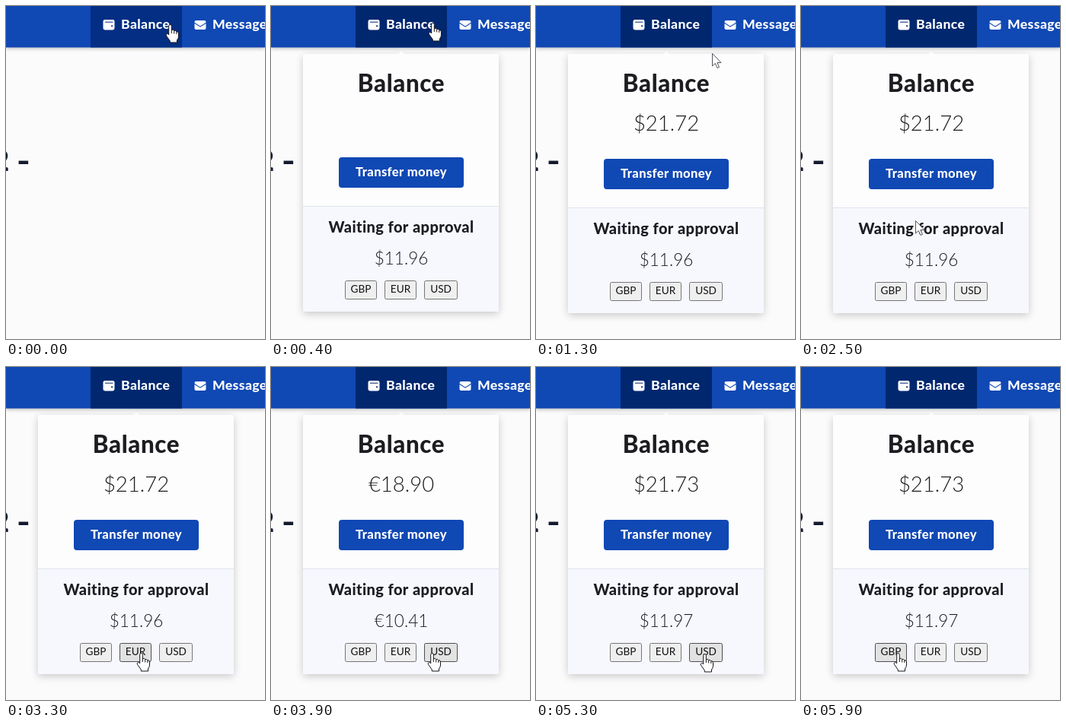
Recreate the animation shown at these times as an HTML page with a canvas. Size 340x438 px, loop 6100 ms.

```html
<!DOCTYPE html>
<html lang="en">
<head>
<meta charset="utf-8">
<title>Balance popup</title>
<style>
html, body { margin: 0; width: 100%; height: 100%; overflow: hidden; background: #fbfbfb; }
canvas { display: block; width: 340px; height: 438px; }
</style>
</head>
<body>
<canvas id="stage"></canvas>
<script>
const W = 340, H = 438, LOOP = 6100, STEP = 100;
const canvas = document.getElementById('stage');
const ctx = canvas.getContext('2d');
const ratio = window.devicePixelRatio || 1;
canvas.width = W * ratio;
canvas.height = H * ratio;
ctx.scale(ratio, ratio);

const FONT = 'Lato, "Open Sans", sans-serif';
const INK = '#1c1c21', BLUE = '#1048b4';
const HEAVY = 800, LIGHT = 300;

// Pointer waypoints: time, x, y
const PATH = [
  [0, 216, 24], [200, 213, 22], [1000, 213, 22], [1300, 232, 62],
  [1500, 266, 130], [1700, 241, 184], [2100, 190, 178], [2400, 151, 196],
  [2500, 151, 282], [2700, 156, 310], [3000, 177, 368], [3100, 178, 376],
  [3400, 178, 376], [3900, 212, 376], [4100, 212, 376], [4300, 222, 377],
  [5400, 222, 377], [5900, 128, 376], [LOOP, 128, 376]
];

// Amounts shown from each time on
const AMOUNTS = [
  [0, '', '$11.96'], [600, '$21.72', '$11.96'],
  [3700, '€18.90', '€10.41'], [4900, '$21.73', '$11.97']
];

const CURRENCIES = [['GBP', 97, 42], ['EUR', 149, 42], ['USD', 201, 44]];

function pointerAt(t) {
  const i = Math.max(1, PATH.findIndex(p => p[0] >= t));
  const [t0, x0, y0] = PATH[i - 1], [t1, x1, y1] = PATH[i];
  const k = (t - t0) / (t1 - t0);
  return { x: x0 + (x1 - x0) * k, y: y0 + (y1 - y0) * k };
}

function inside(p, x, y, w, h) {
  return p.x >= x && p.x < x + w && p.y >= y && p.y < y + h;
}

function box(x, y, w, h, color, r = 0) {
  ctx.fillStyle = color;
  ctx.beginPath();
  ctx.roundRect(x, y, w, h, r);
  ctx.fill();
}

function shadow(color, blur, dy) {
  ctx.shadowColor = color;
  ctx.shadowBlur = blur * ratio;
  ctx.shadowOffsetY = dy * ratio;
}

// Heavy text is tracked slightly wider
function text(str, x, y, size, weight, color = INK, align = 'center', family = FONT) {
  ctx.font = `${weight} ${size}px ${family}`;
  ctx.letterSpacing = weight === HEAVY ? `${size * .02}px` : '0px';
  ctx.textAlign = align;
  ctx.fillStyle = color;
  ctx.fillText(str, x, y);
}

function line(color, width, ...pts) {
  ctx.strokeStyle = color;
  ctx.lineWidth = width;
  ctx.beginPath();
  pts.forEach(([x, y]) => ctx.lineTo(x, y));
  ctx.stroke();
}

function drawHeader(open) {
  const active = open ? '#01276f' : '#032e83';
  ctx.save();
  shadow('rgba(0,0,0,.26)', 5, 1);
  box(0, -10, W, 64.5, BLUE);
  ctx.restore();
  box(111, 0, 120, 54.5, active);

  // wallet
  box(127.5, 18, 15, 13.5, '#fff', 2.4);
  line(active, 1, [130, 21.2], [140.5, 21.2]);
  box(138, 25.2, 2.2, 2.2, active, 1.1);
  text('Balance', 151, 30, 17.6, HEAVY, '#fff', 'left');

  // envelope
  box(247.5, 19, 15, 12, '#fff', 2);
  line(BLUE, 1.1, [247, 22], [255, 27.2], [263, 22]);
  text('Messages', 271, 30, 17.6, HEAVY, '#fff', 'left');
}

function drawCurrency([label, x, w], top, p, pressed) {
  const hover = inside(p, x, top, w, 25);
  const down = pressed === label;
  box(x, top, w, 25, down ? '#f5f5f5' : hover ? '#e2e2e2' : '#efefef', 2);
  ctx.strokeStyle = down ? '#8d8d8d' : hover ? '#4f4f4f' : '#767676';
  ctx.lineWidth = 1;
  ctx.beginPath();
  ctx.roundRect(x + .5, top + .5, w - 1, 24, 2);
  ctx.stroke();
  text(label, x + w / 2, top + 16, 13.6, 400, '#111');
}

function drawPopup(t, p) {
  const [, balance, waiting] = AMOUNTS.findLast(a => t >= a[0]);
  const dy = balance ? 0 : -2;
  ctx.save();
  shadow('rgba(0,0,0,.2)', 11, 3);
  box(42, 63, 257, 341 + dy, '#fdfdfd', 2);
  ctx.restore();
  ctx.fillStyle = '#fdfdfd';
  ctx.beginPath();
  ctx.moveTo(166, 64);
  ctx.lineTo(171, 60);
  ctx.lineTo(176, 64);
  ctx.fill();
  box(42, 265 + dy, 257, 139, '#f6f8fd', [0, 0, 2, 2]);
  box(42, 265 + dy, 257, 1, '#dde3ee');

  text('Balance', 171, 113, 31.3, HEAVY);
  text(balance, 171, 164, 27.5, LIGHT);
  box(89, 201 + dy, 164, 40, BLUE, 4);
  text('Transfer money', 171, 226 + dy, 16.6, HEAVY, '#fff');
  text('Waiting for approval', 171, 300 + dy, 20, HEAVY);
  text(waiting, 171, 342 + dy, 22.5, LIGHT);

  const pressed = t === 3200 ? 'EUR' : t === 4700 ? 'USD' : '';
  CURRENCIES.forEach(c => drawCurrency(c, 363 + dy, p, pressed));
}

const ARROW = new Path2D('M0 0V16.5L3.8 13L6.5 19L9 18L6.4 12H11.5Z');
const HAND = new Path2D('M-1.8 1.8Q-1.8 0 0 0T1.8 1.8V7.2Q4.2 6 5.2 8Q7.4 7.3 8.3 9.2' +
  'Q11 8.8 11 11.5V15.5Q11 18 9 20.5V23.5H-.2V21.5L-5 14.8Q-6 12.6-4.2 12Q-3 11.7-1.8 13.5Z');

function drawPointer(p, hand) {
  const ink = hand ? '#16161a' : '#55555c';
  const shape = hand ? HAND : ARROW;
  ctx.save();
  ctx.translate(Math.round(p.x) - .5, Math.round(p.y) + .5);
  ctx.lineWidth = 1;
  ctx.lineJoin = 'round';
  ctx.fillStyle = '#fff';
  ctx.strokeStyle = ink;
  ctx.fill(shape);
  ctx.stroke(shape);
  if (hand) {
    line(ink, 1, [1.8, 7], [1.8, 11.5]);
    line(ink, 1, [5.2, 8], [5.2, 12]);
    line(ink, 1, [8.3, 9.2], [8.3, 12.5]);
  }
  ctx.restore();
}

function draw(t) {
  const p = pointerAt(t);
  const open = t >= 400;
  box(0, 0, W, H, '#fbfbfb');
  text('2', 5, 217, 38, HEAVY, '#141a2e', 'right');
  text('-', 23, 217, 38, 700, '#141a2e', 'center', 'Inter, sans-serif');
  drawHeader(open);
  if (open) drawPopup(t, p);
  const hand = p.y < 55 || inside(p, 89, 201, 164, 40) ||
    CURRENCIES.some(([, x, w]) => inside(p, x, 363, w, 25));
  drawPointer(p, hand);
}

const start = performance.now();
function tick() {
  const t = (performance.now() - start) % LOOP;
  draw(Math.floor(t / STEP) * STEP);
  requestAnimationFrame(tick);
}
tick();
</script>
</body>
</html>
```
